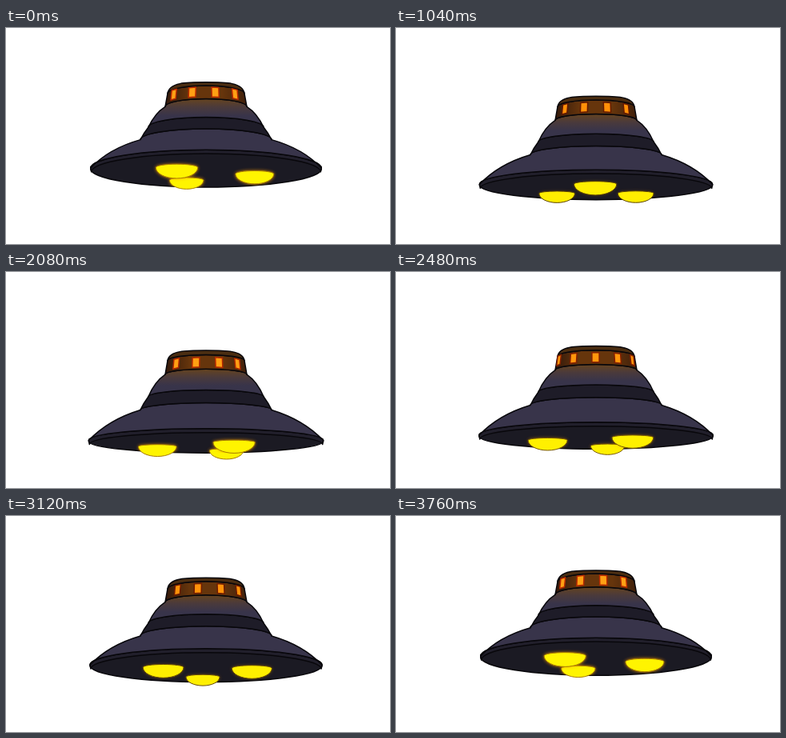
An HTML page that plays this animation: 480x270 px, repeating every 3.84 s.

```html
<!DOCTYPE html>
<html lang="en">
<head>
<meta charset="utf-8">
<title>Flying saucer</title>
<style>
html, body { margin: 0; width: 100%; height: 100%; overflow: hidden; background: #fff; }
svg { display: block; width: 480px; height: 270px; }
</style>
</head>
<body>
<svg id="stage" viewBox="0 0 480 270">
  <defs>
    <linearGradient id="domeFill" x1="0" y1="0" x2="0" y2="1">
      <stop offset="0" stop-color="#66441f"/>
      <stop offset=".3" stop-color="#4a3a3c"/>
      <stop offset=".6" stop-color="#38344a"/>
    </linearGradient>
    <linearGradient id="ringFill">
      <stop offset="0" stop-color="#33190b"/>
      <stop offset=".3" stop-color="#66350c"/>
      <stop offset=".7" stop-color="#66350c"/>
      <stop offset="1" stop-color="#40200b"/>
    </linearGradient>
    <filter id="blur" x="-40%" y="-60%" width="180%" height="220%">
      <feGaussianBlur stdDeviation="2.2"/>
    </filter>
    <clipPath id="under"><path id="underShape"/></clipPath>
  </defs>
  <g id="hull" stroke="#08070b" stroke-width="1.5" stroke-linejoin="round"></g>
  <g id="windows"></g>
  <g id="lamps"></g>
</svg>
<script>
const LOOP = 3840, STEP = 80, CX = 250, TAU = Math.PI * 2;
const $ = id => document.getElementById(id);

function add(parent, attrs) {
  const el = document.createElementNS('http://www.w3.org/2000/svg', 'path');
  set(el, attrs);
  parent.appendChild(el);
  return el;
}
function set(el, attrs) {
  for (const key in attrs) el.setAttribute(key, attrs[key]);
}
function group(parent, attrs) {
  const el = document.createElementNS('http://www.w3.org/2000/svg', 'g');
  set(el, attrs);
  parent.appendChild(el);
  return el;
}

const part = fill => add($('hull'), { fill });
const base = part('#1b1a23'), lip = part('#211f2b'), brim = part('#38344a');
const band = part('#1e1c28'), dome = part('url(#domeFill)');
const ring = part('url(#ringFill)'), lid = part('#4a2d11');
const panes = Array.from({ length: 12 }, () => add($('windows'), { 'stroke-linejoin': 'round' }));
const lamps = [0, 1, 2].map(() => ({
  glow: add(group($('lamps'), { 'clip-path': 'url(#under)' }), { fill: '#ff9d00', filter: 'url(#blur)' }),
  bulb: add($('lamps'), { 'stroke-width': 1 })
}));

function draw(time) {
  const t = Math.floor((time % LOOP) / STEP) * STEP;
  const c = Math.cos(TAU * t / LOOP);
  const cy = 194 - 18 * c;
  const tilt = 0.13 + 0.03 * c;
  const turn = TAU / 3 * t / LOOP;
  const pulse = 0.5 + 0.5 * Math.cos(2 * TAU * t / LOOP);
  const rim = 145.5 - 1.2 * c;
  const lift = h => cy - h * (1 - 0.035 * c);
  const tiltAt = h => tilt + 5e-6 * h * h;
  const pt = (r, h) => `${CX + r} ${lift(h)}`;
  const arc = (r, h, sweep) => `A${Math.abs(r)} ${Math.abs(r) * tiltAt(h)} 0 0 ${sweep} ${pt(r, h)}`;

  // A slice of the hull between two circles; [mr, mh] bends its sides.
  const slice = (r1, h1, r2, h2, mr = (r1 + r2) / 2, mh = (h1 + h2) / 2) =>
    `M${pt(-r1, h1)}${arc(r1, h1, 1)}Q${pt(mr, mh)} ${pt(r2, h2)}` +
    `${arc(-r2, h2, 0)}Q${pt(-mr, mh)} ${pt(-r1, h1)}Z`;

  const under = `M${pt(-rim, 0)}${arc(rim, 0, 1)}${arc(-rim, 0, 1)}Z`;
  set(base, { d: under });
  set($('underShape'), { d: under });
  set(lip, { d: slice(rim, 0.8, rim - 1, -4) });
  set(brim, { d: slice(82, 37.7, rim, 0.8, 122, 26) });
  set(band, { d: slice(72, 53.8, 82, 37.7, 78, 46) });
  set(dome, { d: slice(51, 80.5, 72, 53.8, 64, 72) });
  set(ring, { d: slice(48, 97.5, 51, 80.5) });

  const top = lift(104.5) - 34 * tiltAt(104.5);
  set(lid, {
    d: `M${pt(-48, 97.5)}C${CX - 46} ${top} ${CX - 25} ${top} ${CX} ${top}` +
       `C${CX + 25} ${top} ${CX + 46} ${top} ${pt(48, 97.5)}${arc(-48, 97.5, 0)}Z`
  });

  panes.forEach((el, i) => {
    const a = 0.218 + turn + i * TAU / 12, near = Math.cos(a);
    if (near < 0.35) return set(el, { visibility: 'hidden' });
    const x = CX - 0.5 + 50 * Math.sin(a) * (1 + 0.12 * near);
    const y = lift(89.5) - 60 * tilt * near;
    const w = 4.8 * near - 0.2, lean = 0.8 * Math.sin(a), slope = 1.2 * Math.sin(a);
    set(el, {
      visibility: 'visible',
      d: `M${x - w - lean} ${y - 6 - slope}L${x + w - lean} ${y - 6 + slope}` +
         `L${x + w + lean} ${y + 6 + slope}L${x - w + lean} ${y + 6 - slope}Z`,
      fill: `rgb(255,${144 + 16 * pulse},${8 + 12 * pulse})`,
      stroke: `rgb(${100 + 85 * pulse},${26 + 16 * pulse},0)`,
      'stroke-width': 1.5
    });
  });

  const order = lamps.map((_, i) => -0.58 + turn + i * TAU / 3)
    .sort((a, b) => Math.cos(a) - Math.cos(b));
  order.forEach((a, i) => {
    const near = Math.cos(a), depth = 1 + 0.12 * near;
    const x = CX + 60.5 * Math.sin(a) * depth;
    const y = cy + 6.9 - 58 * tilt * near * depth;
    const w = 23.8 * depth;
    const d = `M${x - w} ${y}A${w} ${w * tilt} 0 0 1 ${x + w} ${y}A${w} ${w * 0.52} 0 0 1 ${x - w} ${y}Z`;
    set(lamps[i].glow, { d, opacity: 0.2 + 0.75 * pulse });
    set(lamps[i].bulb, {
      d,
      fill: `rgb(255,${238 + 6 * pulse},0)`,
      stroke: `rgb(${90 + 80 * pulse},${66 + 60 * pulse},0)`
    });
  });
}

const start = performance.now();
function tick() {
  draw(performance.now() - start);
  requestAnimationFrame(tick);
}
tick();
</script>
</body>
</html>
```
